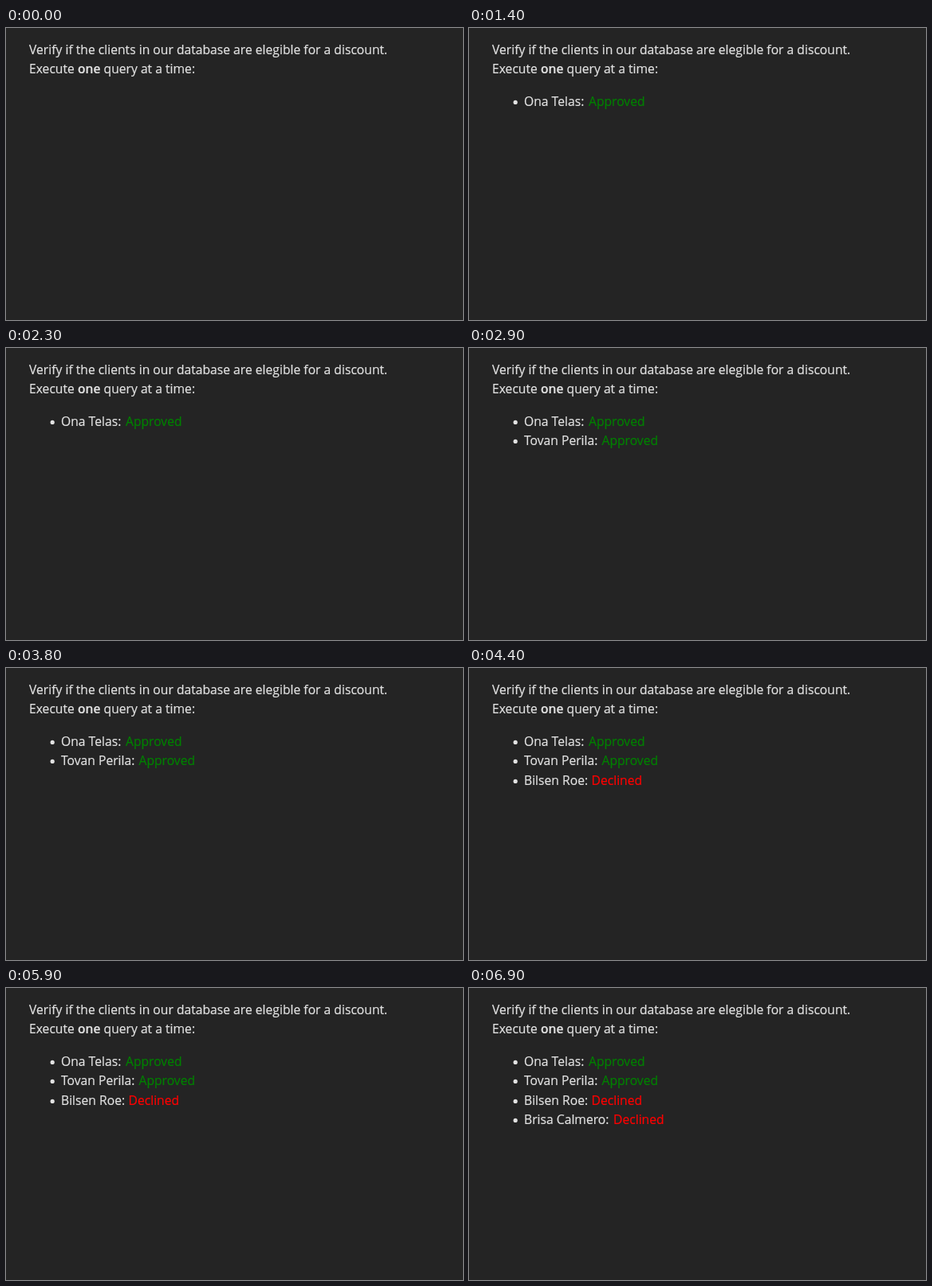
Recreate the animation shown at these times as an HTML page. Size 573x367 px, loop 8000 ms.

```html
<!DOCTYPE html>
<html lang="en">
<head>
<meta charset="utf-8">
<title>Discount check</title>
<style>
  html, body { margin: 0; width: 100%; height: 100%; overflow: hidden; background: #242424; }
  svg { display: block; font: 15.68px "Open Sans", "Noto Sans", sans-serif; color: #e2e2e2; fill: currentColor; }
  /* A hairline outline gives the text a slightly sturdier weight. */
  text { fill: currentColor; stroke: currentColor; stroke-width: .2px; }
</style>
</head>
<body>
<svg id="stage" width="573" height="367" viewBox="0 0 573 367">
  <text x="29" y="33">Verify if the clients in our database are elegible for a discount.</text>
  <text x="29" y="57">Execute <tspan font-weight="600">one</tspan> query at a time:</text>
</svg>
<script>
const LOOP = 8000;
const COLORS = { Approved: "#008000", Declined: "#ff0000" };
const clients = [
  { name: "Ona Telas", result: "Approved", resultX: 150, y: 98, start: 1400 },
  { name: "Tovan Perila", result: "Approved", resultX: 166.5, y: 122, start: 2900 },
  { name: "Bilsen Roe", result: "Declined", resultX: 153.5, y: 147, start: 4400 },
  { name: "Brisa Calmero", result: "Declined", resultX: 181, y: 171, start: 6900 },
];

function add(parent, tag, attributes, text = "") {
  const node = document.createElementNS("http://www.w3.org/2000/svg", tag);
  for (const [key, value] of Object.entries(attributes)) node.setAttribute(key, value);
  node.textContent = text;
  return parent.appendChild(node);
}

const stage = document.getElementById("stage");
for (const client of clients) {
  const { name, result, resultX, y } = client;
  client.row = add(stage, "g", { visibility: "hidden" });
  add(client.row, "circle", { cx: 58.2, cy: y - 4.6, r: 2.6 });
  add(client.row, "text", { x: 69, y }, name + ":");
  add(client.row, "text", { x: resultX, y, color: COLORS[result] }, result);
}

function draw() {
  const time = performance.now() % LOOP;
  for (const { row, start } of clients) {
    row.setAttribute("visibility", time >= start ? "visible" : "hidden");
  }
  requestAnimationFrame(draw);
}
draw();
</script>
</body>
</html>
```
